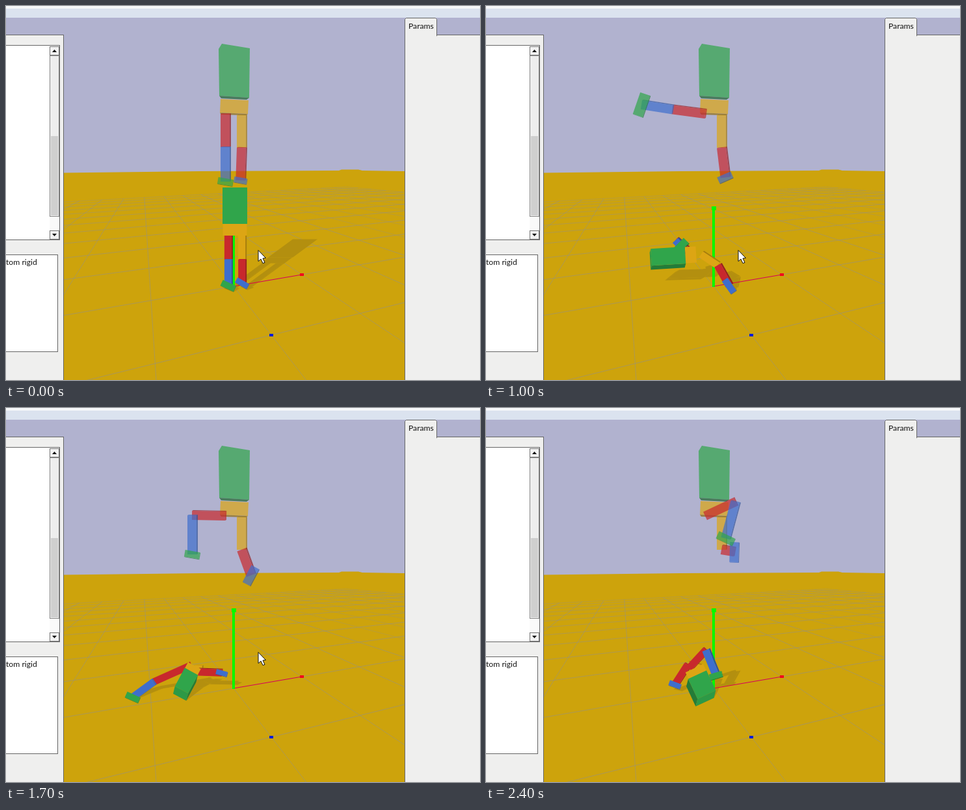
Recreate the animation shown at these times as an HTML page with a canvas. Size 729 px wide and 575 px high, loop 2.5 s.

```html
<!DOCTYPE html>
<html lang="en">
<head>
<meta charset="utf-8">
<title>Walker simulation</title>
<style>
html, body { margin: 0; width: 100%; height: 100%; overflow: hidden; }
canvas { display: block; }
</style>
</head>
<body>
<canvas id="stage" width="729" height="575"></canvas>
<script>
const ctx = document.getElementById('stage').getContext('2d');
const LOOP = 2500, STEP = 100;
const GREEN = [48, 165, 75], YELLOW = [220, 165, 20], RED = [200, 40, 45], BLUE = [62, 110, 205];
const LEFT = [RED, BLUE, GREEN], RIGHT = [YELLOW, RED, BLUE];

// Joint angles in degrees (0 is right, 90 is down) and visible lengths at the key times;
// a single number stays constant.
const KEY_TIMES = [300, 800, 1200, 1700, 2100, 2400];
const GHOST_LEFT = {
  x: 337, y: 166, width: 14, footSize: 20, colors: LEFT,
  thigh: [90, 136, 239, 181, 284, 335], thighLength: 51,
  shin: [90, 78, 300, 90, 101, 105], shinLength: [53, 26, 70, 60, 50, 58]
};
const GHOST_RIGHT = {
  x: 362, y: 168, width: 14, footSize: 17, colors: RIGHT,
  thigh: 90, thighLength: 50,
  shin: [92, 96, 70, 70, -63, 10], shinLength: [50, 50, 42, 42, 38, 20],
  foot: [10, 15, -62, -62, -85, -88]
};
const WALKER_LEFT = {
  width: 11, footSize: 16, colors: LEFT,
  thigh: [90, 121, 321, 156, 150, 313], thighLength: [37, 48, 18, 62, 8, 38],
  shin: [90, 75, 22, 144, 300, 428], shinLength: [40, 6, 18, 40, 28, 42],
  foot: [25, -30, -60, 24, 116, 164]
};
const WALKER_RIGHT = {
  width: 11, footSize: 14, colors: RIGHT,
  thigh: [90, 87, -20, 95, -71, -165], thighLength: [37, 32, 29, 10, 42, 20],
  shin: [90, 100, 21, 2, 56, 123], shinLength: 36,
  foot: [30, 15, 95, 15, 105, 20]
};
const TORSO = {
  x: [352, 340, 273, 285, 277, 325], y: [335, 350, 416, 405, 437, 410],
  spine: [-90, -142, -225, -242, -272, -295],
  length: [56, 57, 48, 32, 35, 34], width: [38, 36, 16, 23, 39, 31]
};

const clamp = k => Math.min(1, Math.max(0, k));
const mix = (a, b, k) => a + (b - a) * k;
const radians = degrees => degrees * Math.PI / 180;
const move = ([x, y], degrees, length) =>
  [x + Math.cos(radians(degrees)) * length, y + Math.sin(radians(degrees)) * length];
const tint = (color, shade = 1) => `rgb(${color.map(c => Math.round(c * shade))})`;

// The first stretch accelerates like a fall, the others run evenly
function pose(part, t) {
  const i = Math.max(0, KEY_TIMES.findLastIndex(key => key <= t));
  const next = Math.min(i + 1, KEY_TIMES.length - 1);
  const k = clamp((t - KEY_TIMES[i]) / (KEY_TIMES[next] - KEY_TIMES[i] || 1));
  const at = v => typeof v[0] === 'number' ? mix(v[i], v[next], i ? k : k * k) : v;
  return Object.fromEntries(Object.entries(part).map(([name, v]) => [name, at(v)]));
}

function polygon(points, fill, stroke) {
  ctx.beginPath();
  points.forEach(p => ctx.lineTo(...p));
  ctx.closePath();
  ctx.fillStyle = fill;
  ctx.fill();
  if (stroke) { ctx.strokeStyle = stroke; ctx.stroke(); }
}

function line(a, b, color, width = 1) {
  ctx.beginPath();
  ctx.moveTo(...a);
  ctx.lineTo(...b);
  ctx.strokeStyle = color;
  ctx.lineWidth = width;
  ctx.stroke();
  ctx.lineWidth = 1;
}

function rect(x, y, w, h, fill, stroke) {
  ctx.fillStyle = fill;
  ctx.fillRect(x, y, w, h);
  if (stroke) { ctx.strokeStyle = stroke; ctx.strokeRect(x + .5, y + .5, w - 1, h - 1); }
}

// Faces of a box around the line from a to b: the front, and the sides turned along the depth vector
function box(a, b, angle, width, [dx, dy], color) {
  const side = (p, sign) => move(p, angle + 90, sign * width / 2);
  const front = [side(a, -1), side(a, 1), side(b, 1), side(b, -1)];
  const cx = (a[0] + b[0]) / 2, cy = (a[1] + b[1]) / 2;
  const faces = [];
  front.forEach((p, i) => {
    const q = front[(i + 1) % 4];
    const outX = (p[0] + q[0]) / 2 - cx, outY = (p[1] + q[1]) / 2 - cy;
    if (outX * dx + outY * dy > 0) {
      const points = [p, q, [q[0] + dx, q[1] + dy], [p[0] + dx, p[1] + dy]];
      faces.push({ points, fill: tint(color, i % 2 ? .75 : .93) });
    }
  });
  return [...faces, { points: front, fill: tint(color) }];
}

function leg(part, t, hip) {
  const p = pose(part, t);
  hip ??= [p.x, p.y];
  const knee = move(hip, p.thigh, p.thighLength), ankle = move(knee, p.shin, p.shinLength);
  const foot = p.foot ?? p.shin - 80;
  const size = p.footSize * (1 + .8 * Math.abs(Math.sin(radians(foot))));
  return [
    ...box(hip, knee, p.thigh, p.width, [2, -1], p.colors[0]),
    ...box(knee, ankle, p.shin, p.width, [2, -1], p.colors[1]),
    ...box(move(ankle, foot, -size / 2), move(ankle, foot, size / 2), foot, size * .45, [1, 1], p.colors[2])
  ];
}

function walker(t) {
  const { x, y, spine, length, width } = pose(TORSO, t);
  const waist = [x, y], hips = move(waist, spine, -length * .32);
  const turned = (1 - Math.cos(radians(spine + 90))) / 2;
  const hip = side => [hips[0] + side * width * .28, hips[1]];
  return [
    ...leg(WALKER_RIGHT, t, hip(1)),
    ...leg(WALKER_LEFT, t, hip(-1)),
    ...box(waist, hips, spine, width * .97, [0, 0], YELLOW),
    ...box(waist, move(waist, spine, length), spine, width, [-3 * turned, 12 * turned], GREEN)
  ];
}

const draw = faces => faces.forEach(f => polygon(f.points, f.fill));

// Light from the left lays every raised point down towards the upper right
function drawShadow(faces) {
  const cast = ([x, y]) => {
    const lift = Math.max(0, 438 - y);
    return [x + lift * .68, y + lift * .5];
  };
  faces.forEach(f => polygon(f.points.map(cast), 'rgb(179,143,15)'));
}

function drawGhost(t) {
  const left = () => draw(leg(GHOST_LEFT, t));
  const body = () => {
    polygon([[330, 143], [373, 145], [372, 166], [329, 164]], tint(YELLOW));
    polygon([[329, 164], [372, 166], [369, 168], [331, 167]], tint(YELLOW, .65));
    polygon([[332, 58], [375, 65], [374, 141], [328, 138], [327, 66]], tint(GREEN));
    polygon([[328, 138], [374, 141], [370, 144], [331, 142]], tint(GREEN, .6));
  };
  const leftBehind = Math.sin(radians(pose(GHOST_LEFT, t).thigh)) < -.9;
  ctx.globalAlpha = .7;
  draw(leg(GHOST_RIGHT, t));
  (leftBehind ? [left, body] : [body, left]).forEach(paint => paint());
  ctx.globalAlpha = 1;
}

// Perspective position of a point on the ground plane
function ground(i, j) {
  const w = 1 + .0948 * i - .293 * j;
  return [(350 + 148.1 * i - 61.5 * j) / w, (431 + 21.2 * i - 73.3 * j) / w];
}

function drawGround() {
  rect(0, 0, 729, 575, 'rgb(177,178,207)');
  polygon([[89, 256.5], [300, 254], [512, 253], [516, 251.5], [542, 251.5], [548, 253], [613, 254],
    [613, 575], [89, 575]], 'rgb(205,163,12)');
  const grid = alpha => `rgba(150,145,130,${alpha})`;
  for (let i = -8; i <= 12; i++) {
    line(ground(i, -11), ground(i, Math.min(2, (.9 + .0948 * i) / .293)), grid(i > 3 ? .35 : .6));
  }
  for (let j = -11; j <= 2; j++) {
    line(ground(Math.max(-8, (.293 * j - .9) / .0948), j), ground(12, j), grid(.65 + j * .025));
  }
}

function drawAxes() {
  line([350, 431], [455, 413], 'rgb(225,0,70)');
  rect(452, 411, 6, 4, 'rgb(240,0,30)');
  rect(405, 504, 6, 4, 'rgb(0,30,215)');
  line([350, 311], [350, 432], 'rgb(0,250,0)', 4);
  rect(347, 308, 7, 6, 'rgb(0,250,0)');
}

function scrollButton(y, direction) {
  rect(67, y, 15, 14, '#f2f2f2', '#777');
  const base = y + 7 - direction * 2;
  polygon([[71, base], [78, base], [74.5, base + direction * 4]], '#111');
}

function drawPanels() {
  const edge = '#666', face = '#efefee';
  rect(0, 0, 729, 18, 'rgb(219,227,239)');
  rect(0, 0, 729, 4, 'rgb(246,247,249)');
  rect(-2, 44, 91, 540, face, edge);
  rect(-2, 60, 85, 300, '#fff', edge);
  rect(67, 61, 15, 298, '#fafafa');
  rect(67, 76, 15, 248, '#eee', '#888');
  rect(69, 200, 11, 122, '#cfcfcf');
  scrollButton(62, -1);
  scrollButton(345, 1);
  rect(-2, 382, 82, 150, '#fff', edge);
  rect(613, 44, 120, 540, face, edge);
  polygon([[613.5, 46], [613.5, 20.5], [615.5, 18.5], [660.5, 18.5], [662.5, 20.5], [662.5, 46]], face, edge);
  rect(614, 44, 48, 4, face);
  ctx.fillStyle = '#111';
  ctx.font = '12.2px Lato, sans-serif';
  ctx.fillText('Params', 619, 35);
  ctx.fillText('tom rigid', 0, 398);
}

function drawCursor(t) {
  if (t >= 2200) return;
  const k = clamp((t - 1700) / 400);
  const x = mix(388, 92.5, k), y = mix(375.5, 54.5, k);
  const arrow = [[0, 0], [0, 17], [4, 13.5], [7, 20], [10, 19], [7, 12.5], [11.5, 12]];
  polygon(arrow.map(p => [p[0] + x, p[1] + y]), '#fff', '#111');
}

function frame() {
  let t = Math.floor(performance.now() % LOOP / STEP) * STEP;
  if (t === 2300) t = 2200; // the picture rests for one step here
  const body = walker(t);
  drawGround();
  drawShadow(body);
  drawAxes();
  draw(body);
  drawGhost(t);
  drawPanels();
  drawCursor(t);
  requestAnimationFrame(frame);
}
frame();
</script>
</body>
</html>
```
